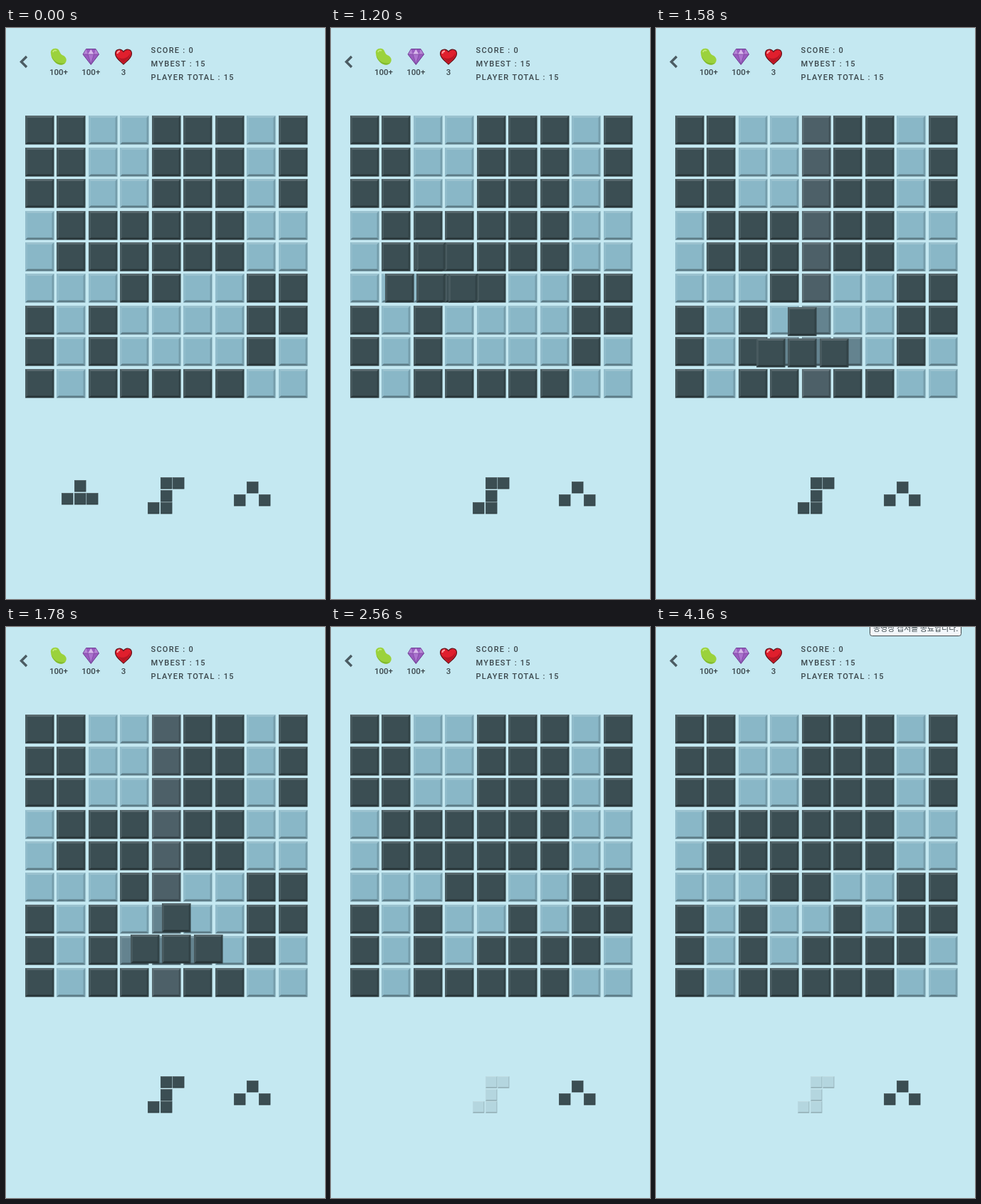
Animation, 448 px wide and 802 px high, one loop 4.34 s. Source, as an HTML page with a canvas:

```html
<!DOCTYPE html>
<html lang="ko">
<head>
<meta charset="utf-8">
<title>Block puzzle</title>
<style>
  html, body { margin: 0; width: 100%; height: 100%; overflow: hidden; background: #c4e8f1; }
  canvas { display: block; }
</style>
</head>
<body>
<canvas id="stage" width="448" height="802"></canvas>
<script>
const ctx = document.getElementById('stage').getContext('2d');
const LOOP = 4340, PICK = 900, DROP = 2560;
const SIZE = 9, PITCH = 44.45, CELL = 40.5, LEFT = 27, TOP = 123.3;
const BACK = '#c4e8f1', INK = '#3a464b';
const DARK = '#3b4e53', EMPTY = '#89b7c7', GHOST = '#64838f', GLOW = '#4d6068', PALE = '#b4d6df';

const board = [
  '##..###.#', '##..###.#', '##..###.#',
  '.######..', '.######..', '...##..##',
  '#.#....##', '#.#....#.', '#.#####..'
];

// Blocks of each piece as [column, row]
const tee = [[1, 0], [0, 1], [1, 1], [2, 1]];
const zig = [[1, 0], [2, 0], [1, 1], [0, 2], [1, 2]];
const arch = [[1, 0], [0, 1], [2, 1]];

// Drag positions: start time, left, top
const drag = [
  [900, 29, 368], [1000, 33, 350], [1100, 48, 322], [1200, 76, 301],
  [1280, 108, 326], [1380, 132, 366], [1480, 134, 391], [1580, 141, 392],
  [1680, 156, 391], [1780, 175, 388], [1880, 209, 371], [2080, 200, 374],
  [2180, 196, 376], [2370, 199, 373]
];

function polygon(color, points) {
  ctx.fillStyle = color;
  ctx.beginPath();
  points.forEach(([x, y]) => ctx.lineTo(x, y));
  ctx.fill();
}

function block(x, y, size, color, bevel) {
  const r = x + size, b = y + size, e = bevel;
  ctx.fillStyle = color;
  ctx.fillRect(x, y, size, size);
  polygon('rgba(255,255,255,.15)', [[x, y], [r, y], [r - e, y + e], [x + e, y + e]]);
  polygon('rgba(255,255,255,.07)', [[x, y], [x + e, y + e], [x + e, b - e], [x, b]]);
  polygon('rgba(0,0,0,.14)', [[r, y], [r, b], [r - e, b - e], [r - e, y + e]]);
  polygon('rgba(0,0,0,.32)', [[x, b], [x + e, b - e], [r - e, b - e], [r, b]]);
}

function drawPiece(shape, x, y, pitch, size, color, bevel) {
  for (const [c, r] of shape)
    block(Math.round(x + c * pitch), Math.round(y + r * pitch), size, color, bevel);
}

const drawTray = (shape, x, y, color = DARK) => drawPiece(shape, x, y, 17.7, 16.4, color, 1);

function drawBoard(t, pose) {
  const cells = board.map(row => [...row].map(ch => ch === '#' ? DARK : EMPTY));
  if (t >= DROP) {
    for (const [c, r] of tee) cells[6 + r][4 + c] = DARK;
  } else if (pose) {
    const col = Math.round((pose[1] - LEFT) / PITCH);
    const row = Math.round((pose[2] - TOP) / PITCH);
    const spots = tee.map(([c, r]) => [col + c, row + r]);
    if (spots.every(([c, r]) => cells[r][c] === EMPTY)) {
      for (const [c, r] of spots) cells[r][c] = GHOST;
      for (let c = 0; c < SIZE; c++)
        if (cells.every(line => line[c] !== EMPTY))
          for (const line of cells) if (line[c] === DARK) line[c] = GLOW;
    }
  }
  cells.forEach((line, r) => line.forEach((color, c) =>
    block(Math.round(LEFT + c * PITCH), Math.round(TOP + r * 44.4), CELL, color, 3)));
}

function text(str, x, y, font, align = 'left', spacing = '0px') {
  ctx.font = font;
  ctx.textAlign = align;
  ctx.letterSpacing = spacing;
  ctx.fillStyle = INK;
  ctx.fillText(str, x, y);
}

function shape(path, fill, stroke, width = 1) {
  const p = new Path2D(path);
  if (fill) { ctx.fillStyle = fill; ctx.fill(p); }
  if (stroke) { ctx.strokeStyle = stroke; ctx.lineWidth = width; ctx.stroke(p); }
}

function drawHeader() {
  shape('M29 40L21.5 47.5L29 55', null, '#4c5c63', 3.4);

  // Bean
  shape('M63 36C62 31 66 28 71 29C76 30 75 36 79 38C84 40 86 44 84 48C81 53 74 53 69 48C65 44 63 40 63 36Z', '#9bd23c');
  shape('M64 39C67 47 74 51 83 49C79 53 73 52 69 48C66 45 64 42 64 39Z', '#80b92f');
  shape('M66 34C67 31 69 31 71 32', null, '#c6ec7c', 1.8);

  // Gem
  shape('M112.5 29.5H126L130.5 37L119.3 51.5L108 37Z', '#9a5cc0', '#6b3b91');
  shape('M112.5 30L115 37H108.5ZM126 30L123.5 37H130Z', '#b786d6');
  shape('M115 37L119.3 30L123.5 37Z', '#d9b8ec');
  shape('M115 37H123.5L119.3 51Z', '#ac74cf');
  shape('M108 37H130.5M115 37L119.3 51L123.5 37', null, '#7b489f', .8);

  // Heart
  shape('M165 51C161 47 153.5 42.5 153.5 36C153.5 29.5 161.5 28 165 33.5C168.5 28 176.5 29.5 176.5 36C176.5 42.5 169 47 165 51Z', '#e01f2d', '#5f1017', 1.2);
  shape('M174.5 35C175 42 169 45 165 49C162 46 159 44 157 41C164 45 172 42 174.5 35Z', '#b81624');
  shape('M156.5 36C156.5 33.5 158 32.5 160 32.5', null, '#ff9da2', 2);

  const label = '500 11.5px Roboto, sans-serif';
  text('100+', 74, 66, label, 'center');
  text('100+', 119.3, 66, label, 'center');
  text('3', 165, 66, label, 'center');
  ['SCORE : 0', 'MYBEST : 15', 'PLAYER TOTAL : 15'].forEach((line, i) =>
    text(line, 203.5, 35 + i * 19.1, '500 11px Roboto, sans-serif', 'left', '1.25px'));
}

function drawTip(message, y, width) {
  ctx.beginPath();
  ctx.roundRect(300.5, y + .5, width, 22, 3);
  ctx.fillStyle = '#f3f7fb';
  ctx.fill();
  ctx.strokeStyle = '#42474a';
  ctx.lineWidth = 1;
  ctx.stroke();
  text(message, 305, y + 15.5, '11px "Noto Sans CJK KR", "Noto Sans CJK", sans-serif');
}

function draw(t) {
  ctx.fillStyle = BACK;
  ctx.fillRect(0, 0, 448, 802);
  const pose = t < DROP && drag.findLast(step => step[0] <= t);

  drawHeader();
  drawBoard(t, pose);
  if (t < PICK) drawTray(tee, 78, 635);
  drawTray(zig, 199, 631, t < DROP ? DARK : PALE);
  drawTray(arch, 320, 637);
  if (pose) drawPiece(tee, pose[1], pose[2], PITCH, CELL, DARK, 3);

  if (t >= 4060) drawTip('동영상 캡처를 종료합니다.', t < 4160 ? -3 : -10, 128);
  else if (t >= 3960) drawTip('동영상 캡처 메뉴 바를 자유롭게', 5, 160);
}

const start = performance.now();
function tick() {
  draw((performance.now() - start) % LOOP);
  requestAnimationFrame(tick);
}
tick();
</script>
</body>
</html>
```
